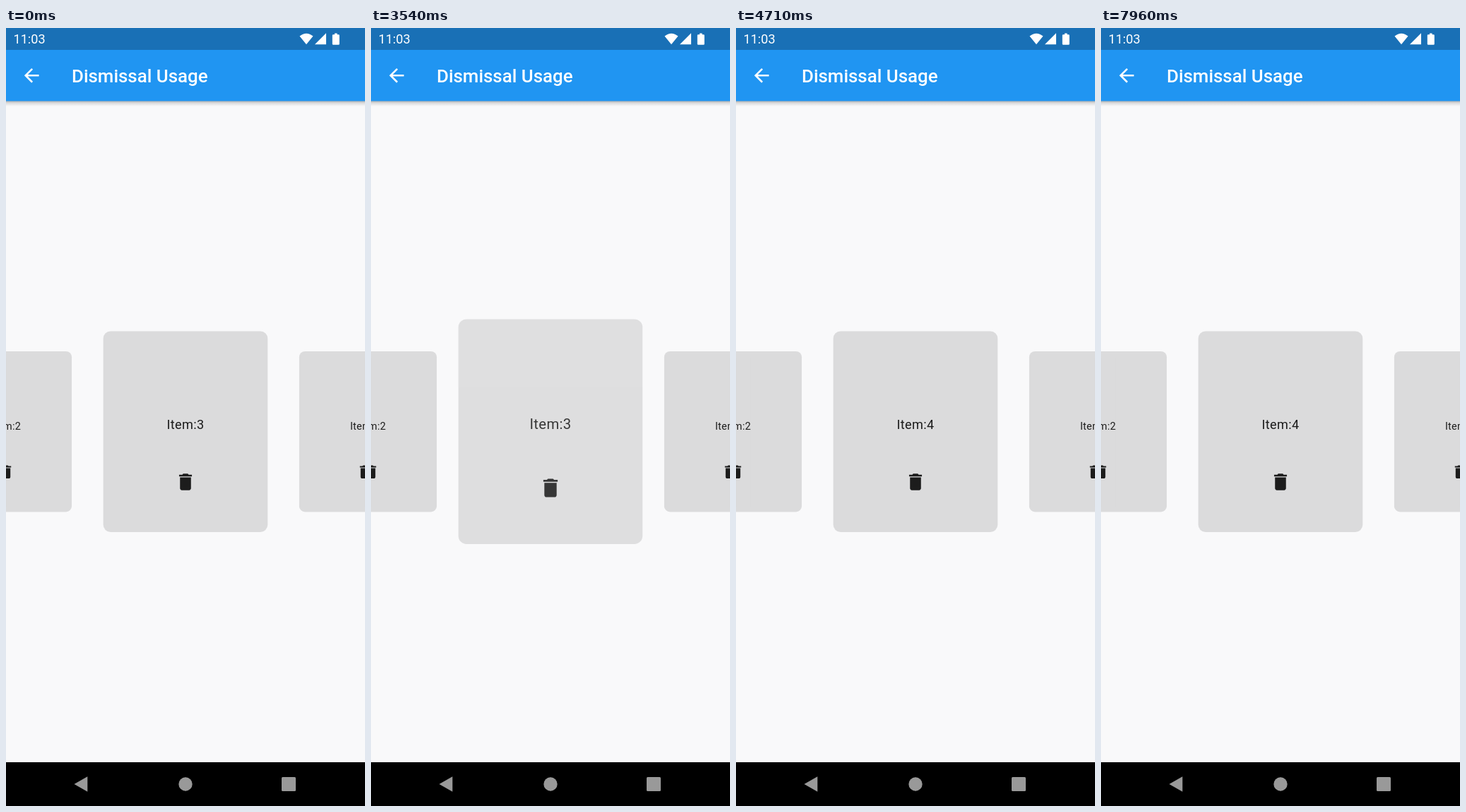
These frames come from a looping animation (508 px wide and 1102 px high, 8 s). An HTML page:

```html
<!DOCTYPE html>
<html lang="en">
<head>
<meta charset="utf-8">
<title>Dismissal Usage</title>
<style>
  html, body { margin: 0; width: 100%; height: 100%; overflow: hidden; background: #f9f9fa; }
  svg { display: block; width: 508px; height: 1102px; font-family: Roboto, sans-serif; }
</style>
</head>
<body>
<svg viewBox="0 0 508 1102">
  <defs>
    <linearGradient id="shade" x2="0" y2="1">
      <stop offset="0" stop-opacity=".32"/>
      <stop offset=".4" stop-opacity=".12"/>
      <stop offset="1" stop-opacity="0"/>
    </linearGradient>
    <g id="card">
      <rect x="-116.4" y="-142.2" width="232.7" height="284.4" rx="10.3" fill-opacity=".12"/>
      <path fill="#1c1c1c" transform="translate(0 71.3) scale(1.293) translate(-12 -12)"
        d="M6 19c0 1.1.9 2 2 2h8c1.1 0 2-.9 2-2V7H6zM19 4h-3.5l-1-1h-5l-1 1H5v2h14z"/>
    </g>
  </defs>
  <rect width="508" height="1102" fill="#f9f9fa"/>
  <g id="cards"></g>
  <rect y="103" width="508" height="8" fill="url(#shade)"/>
  <rect width="508" height="103.5" fill="#2095f2"/>
  <rect width="508" height="31" fill="#1970b6"/>
  <g fill="#fff">
    <text x="10.5" y="22.4" font-size="18.1">11:03</text>
    <path d="M415.5 11.6Q425 3.8 434.5 11.6L425 23.3z"/>
    <path d="M437 23.3L453 7.3V23.3z"/>
    <path d="M465 7.5h3.6v1.7h2q1.2 0 1.2 1.2v12.2q0 1.2-1.2 1.2h-7.6q-1.2 0-1.2-1.2v-12.2q0-1.2 1.2-1.2h2z"/>
    <path transform="translate(36.2 67.3) scale(1.293) translate(-12 -12)"
      d="M20 11H7.83l5.59-5.59L12 4l-8 8 8 8 1.41-1.41L7.83 13H20z"/>
    <text x="93" y="77" font-size="25.86" font-weight="500">Dismissal Usage</text>
  </g>
  <rect y="1040" width="508" height="62"/>
  <g fill="#999">
    <path d="M96.5 1071L115.3 1060.3V1081.7z"/>
    <circle cx="254" cy="1071" r="9.7"/>
    <rect x="390" y="1061" width="20" height="20" rx="1.5"/>
  </g>
</svg>
<script>
const LOOP = 8000, GAP = 254, MID_Y = 571.7;
const DISMISS = { start: 3457, length: 700 };
const SLIDE = { start: 4157, length: 480 };
const layer = document.getElementById('cards');

const progress = (t, { start, length }) => Math.min(1, Math.max(0, (t - start) / length));
const ease = p => p * p * (3 - 2 * p);

function makeCard(n) {
  const g = document.createElementNS('http://www.w3.org/2000/svg', 'g');
  g.innerHTML = `<use href="#card"/><text y="-3.6" text-anchor="middle" font-size="18.1"
    letter-spacing=".32" fill="#1c1c1c">Item:${n}</text>`;
  return layer.appendChild(g);
}

function place(card, slot, zoom = 1, opacity = 1) {
  const scale = zoom * (1 - 0.2 * Math.min(1, Math.abs(slot)));
  card.setAttribute('transform', `translate(${254 + slot * GAP} ${MID_Y}) scale(${scale})`);
  card.setAttribute('opacity', opacity);
}

const [left, gone, next, last] = [2, 3, 4, 5].map(makeCard);

function draw(t) {
  const out = progress(t, DISMISS);
  const shift = ease(progress(t, SLIDE));
  place(left, -1);
  place(gone, 0, 1 + out, 1 - out);
  place(next, 1 - shift);
  place(last, 2 - shift);
}

const begin = performance.now();
function tick() {
  draw((performance.now() - begin) % LOOP);
  requestAnimationFrame(tick);
}
tick();
</script>
</body>
</html>
```
